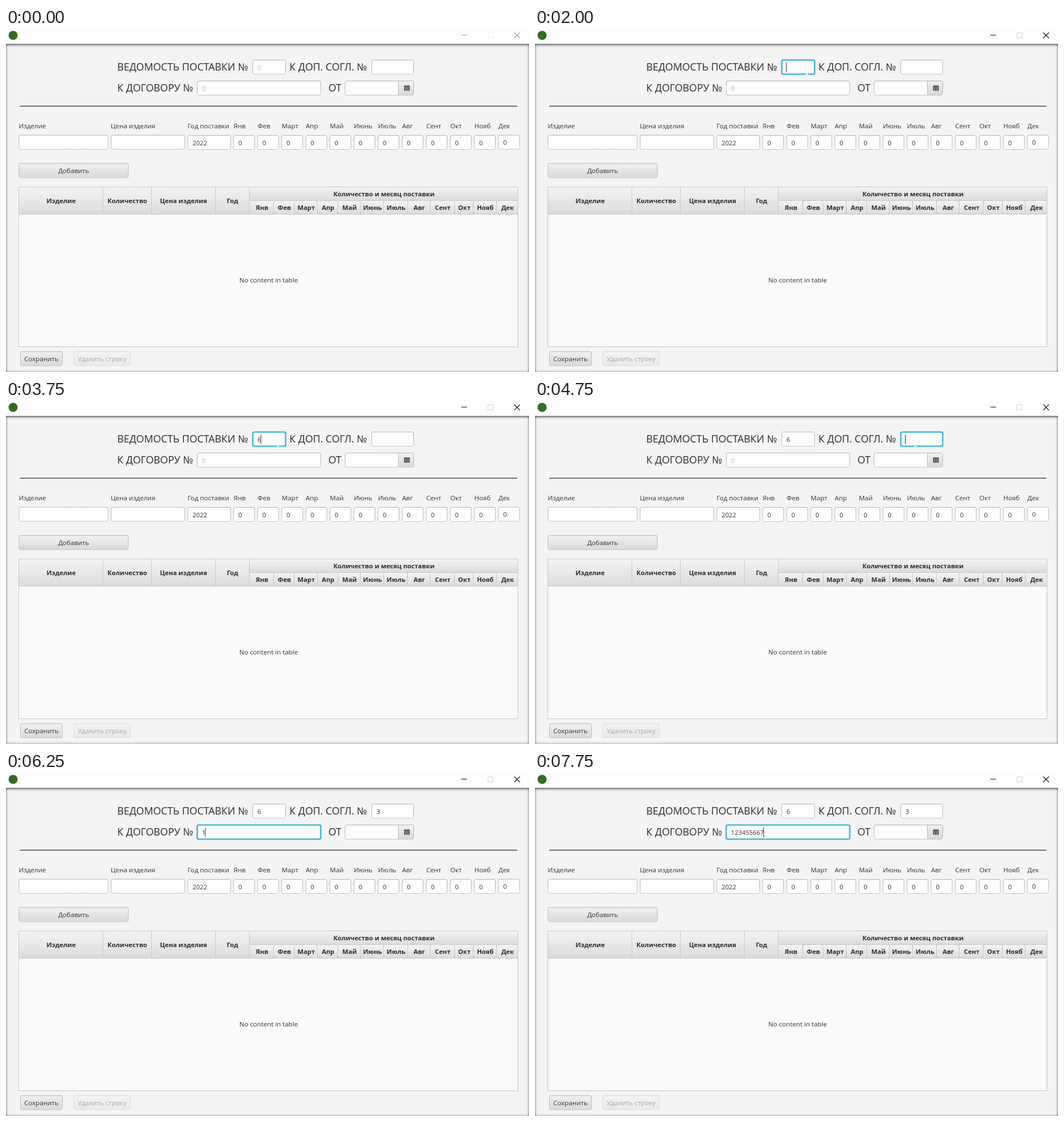
Recreate the animation shown at these times as an HTML page. Size 923 px wide and 607 px high, loop 8000 ms.

```html
<!DOCTYPE html>
<html lang="ru">
<head>
<meta charset="utf-8">
<style>
html, body { margin: 0; width: 100%; height: 100%; overflow: hidden; background: #fdfdfd; }
#pane { position: absolute; left: 0; top: 28px; width: 923px; height: 579px; background: #f4f4f4; box-shadow: inset 0 3px 5px -2px #000b, inset 0 0 5px #0006; }
svg { position: absolute; left: 0; top: 0; }
text { font: 11.6px "Open Sans", "Noto Sans", sans-serif; fill: #333; white-space: pre; }
.big { font-size: 17.8px; fill: #2b2b2b; }
.num { font-size: 11.3px; }
.hint { fill: #b0b0b0; }
.bold { font-size: 11.25px; font-weight: 700; fill: #2b2b2b; }
.mid { text-anchor: middle; }
</style>
</head>
<body>
<div id="pane"></div>
<svg width="923" height="607" viewBox="0 0 923 607">
  <defs>
    <linearGradient id="btn" x2="0" y2="1"><stop stop-color="#f1f1f1"/><stop offset="1" stop-color="#d9d9d9"/></linearGradient>
    <linearGradient id="head" x2="0" y2="1"><stop stop-color="#f3f3f3"/><stop offset="1" stop-color="#dbdbdb"/></linearGradient>
    <linearGradient id="edge" x2="0" y2="1"><stop stop-color="#b0b0b0"/><stop offset="1" stop-color="#c4c4c4"/></linearGradient>
  </defs>
  <g id="fixed"></g>
  <g id="live"></g>
</svg>
<script>
const LOOP = 8000, STEP = 250, DIGIT = 6.45;
const months = ['Янв', 'Фев', 'Март', 'Апр', 'Май', 'Июнь', 'Июль', 'Авг', 'Сент', 'Окт', 'Нояб', 'Дек'];

const rect = (x, y, w, h, fill, more = '') =>
  `<rect x="${x}" y="${y}" width="${w}" height="${h}" fill="${fill}" ${more}/>`;
const text = (x, y, s, cls = '') => `<text x="${x}" y="${y}" class="${cls}">${s}</text>`;
const path = (d, color, width = 1) => `<path d="${d}" fill="none" stroke="${color}" stroke-width="${width}"/>`;
const box = (x, y, w, h, fill = '#fdfdfd') => rect(x + .5, y + .5, w - 1, h - 1, fill, 'rx="2.5" stroke="url(#edge)"');
const input = (x, y, w, value = '', cls = 'num') => box(x, y, w, 26) + text(x + 8.8, y + 17.5, value, cls);
const button = (x, y, w, label) =>
  box(x, y, w, 26, 'url(#btn)') + text(x + w / 2, y + 17.5, label, 'mid');

function header() {
  return text(196.3, 75, 'ВЕДОМОСТЬ ПОСТАВКИ №', 'big') + text(500.3, 75, 'К ДОП. СОГЛ. №', 'big') +
    text(196.3, 112, 'К ДОГОВОРУ №', 'big') + text(569, 112, 'ОТ', 'big') +
    box(598, 93, 122, 26) + rect(693, 94, 26, 24, 'url(#btn)') + path('M692.5 94V118', '#b9b9b9') +
    rect(702.5, 101.5, 10, 9, '#4c4c4c') + path('M703.5 104.5H711.5M703.5 107.5H711.5M705.5 104V110M709.5 104V110', '#bbb', .7) +
    rect(25, 137.3, 877.5, 1.4, '#3c3c3c');
}

function form() {
  let s = text(22.5, 177, 'Изделие') + text(185, 177, 'Цена изделия') + text(320.5, 177, 'Год поставки') +
    input(22.4, 188.6, 158.2) + input(185, 188.6, 131) + input(320.4, 189, 76.6, '2022');
  months.forEach((m, i) => {
    const x = 401.2 + 42.5 * i;
    s += text(x + .3, 177, m) + input(x, i < 11 ? 189 : 188.5, 38, '0');
  });
  return s + button(22.4, 238.5, 194, 'Добавить');
}

function table() {
  const cols = [23, 171, 256.5, 369.5, 429.5];
  const subs = [429.5, 472.5, 508.5, 549.5, 585.5, 625.5, 666.5, 708.5, 748.5, 791.5, 824.5, 865.5, 903.5];
  let s = rect(22.5, 280.5, 881, 282, '#fafafa', 'stroke="#c6c6c6"') +
    rect(23, 281, 407, 48, 'url(#head)') + rect(430, 281, 473, 24, 'url(#head)') +
    rect(430, 305, 473, 24, 'url(#head)') + path('M23 328.5H903M430 304.5H903', '#c6c6c6');
  ['Изделие', 'Количество', 'Цена изделия', 'Год'].forEach((t, i) => {
    s += text((cols[i] + cols[i + 1]) / 2 + .3, 309, t, 'bold mid') + path(`M${cols[i + 1]} 281V329`, '#c6c6c6');
  });
  months.forEach((m, i) => {
    s += text((subs[i] + subs[i + 1]) / 2 + .8, 321, m, 'bold mid');
    if (i) s += path(`M${subs[i]} 305V329`, '#c6c6c6');
  });
  return s + text(667, 297, 'Количество и месяц поставки', 'bold mid') +
    text(463.5, 449, 'No content in table', 'mid');
}

document.getElementById('fixed').innerHTML =
  '<circle cx="12.5" cy="13" r="8" fill="#356b22"/>' + header() + form() + table() +
  button(25, 570.5, 75, 'Сохранить') +
  `<g opacity=".4">${button(119, 570.5, 101, 'Удалить строку')}</g>`;

const fields = [
  { x: 435, y: 56, w: 59, hint: '0', from: 500, to: 4500, notch: 480 },
  { x: 645, y: 56, w: 75, hint: '', from: 4500, to: 6000, notch: 671 },
  { x: 337, y: 93, w: 219, hint: '0', from: 6000, to: LOOP },
];
// spans in which the text caret is shown
const carets = [[500, 750], [1250, 1500], [2000, 3000], [3750, 4250], [4500, 5000], [5250, LOOP]];

function values(t) {
  const typed = t < 6250 ? 0 : 1 + Math.floor((t - 6250) / STEP * 8 / 6);
  return [t < 2500 ? '' : '6', t < 5750 ? '' : '3', '123455667'.slice(0, typed)];
}

// bright ring with a faint glow on both sides
const ring = (f, inset, width, opacity) =>
  rect(f.x + inset, f.y + inset, f.w - 2 * inset, 26 - 2 * inset, 'none',
    `rx="2.5" stroke="#039ed3" stroke-width="${width}" opacity="${opacity}"`);

function drawField(f, value, t) {
  const focus = t >= f.from && t < f.to;
  let s = value || focus ? input(f.x, f.y, f.w, value) : input(f.x, f.y, f.w, f.hint, 'num hint');
  if (!focus) return s;
  s += ring(f, .8, 4.4, .14) + ring(f, .5, 1.6, .9);
  if (f.notch) s += rect(f.notch - 2, f.y + 25, 4, 2, '#f4f8fa');
  if (carets.some(([a, b]) => t >= a && t < b))
    s += rect(f.x + 8 + value.length * DIGIT, f.y + 5, 1, 17, '#333');
  return s;
}

function windowButtons(active) {
  const ink = active ? '#111' : '#999';
  return path('M803.5 12.5H813.5', ink) + path('M850.5 8.5H859.5V17.5H850.5Z', active ? '#d2d2d2' : '#eee') +
    path('M897 8L907 18M907 8L897 18', ink, 1.1);
}

const live = document.getElementById('live');
let last = -1;
function frame(now) {
  const t = Math.floor(now % LOOP / STEP) * STEP;
  if (t !== last) {
    const v = values(t);
    live.innerHTML = windowButtons(t >= 250) + fields.map((f, i) => drawField(f, v[i], t)).join('');
    last = t;
  }
  requestAnimationFrame(frame);
}
frame(performance.now());
</script>
</body>
</html>
```
